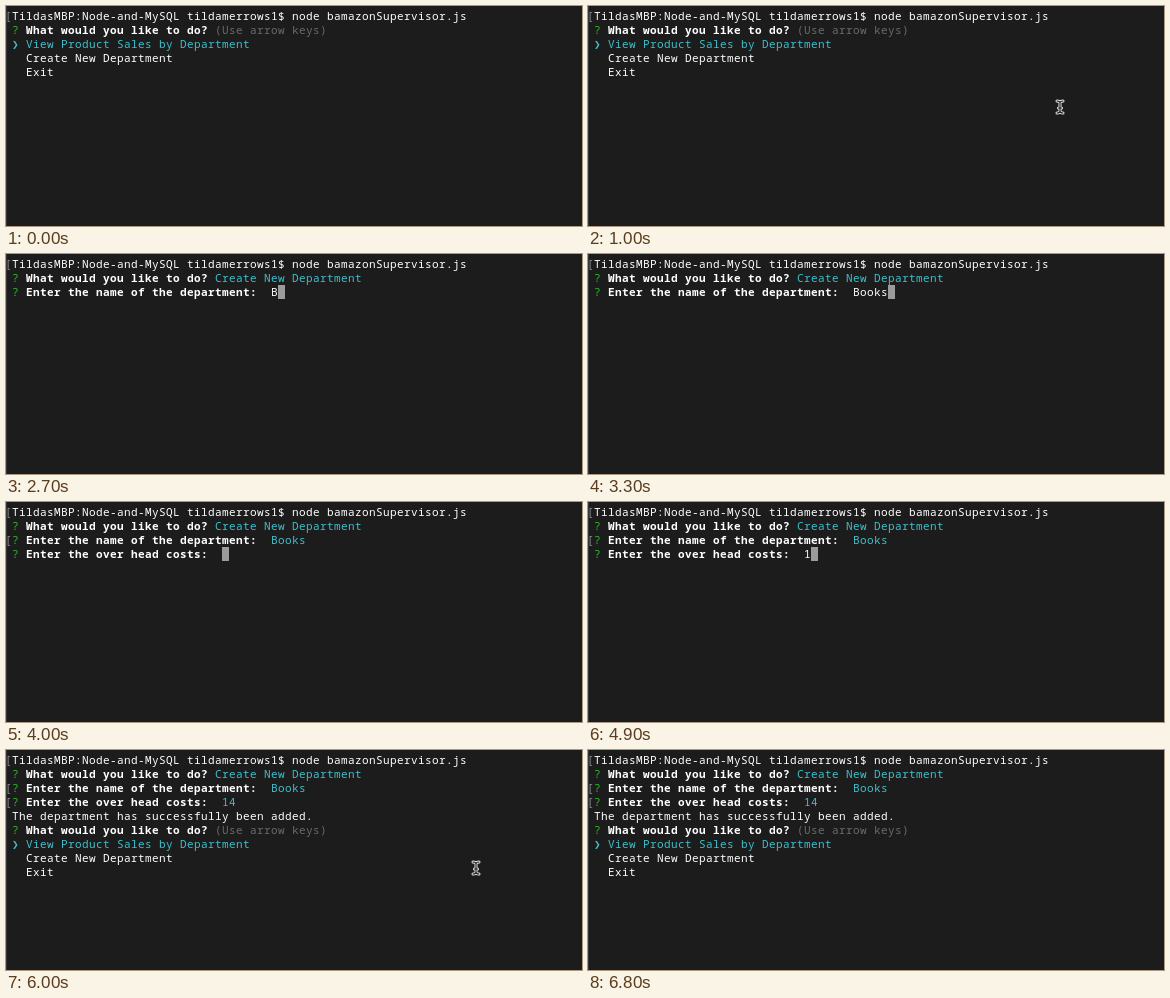
Write an HTML page that moves like this. It is 576 by 220 pixels and loops after 7 s.

```html
<!DOCTYPE html>
<html lang="en">
<head>
<meta charset="utf-8">
<title>Department prompt</title>
<style>
  html, body { margin: 0; width: 100%; height: 100%; overflow: hidden; background: #1c1c1c; }
  #stage { position: relative; width: 576px; height: 220px; overflow: hidden; background: #1c1c1c; }
  #stage::before { content: ""; position: absolute; left: 0; top: 0; width: 1px; height: 100%; background: #38383b; }
  #screen {
    position: absolute; left: 6px; top: 3px;
    font: 500 11px/14px "Noto Sans Mono", "DejaVu Sans Mono", monospace;
    letter-spacing: 0.4px; font-variant-ligatures: none; color: #fff; white-space: pre;
  }
  .row { position: relative; height: 14px; }
  .mark { position: absolute; left: -7px; color: #8c8c8c; }
  .ask { color: #25bc24; }
  .pick { color: #3fbfcb; }
  .hint { color: #6a6a6a; }
  .arrow { display: inline-block; width: 14px; height: 14px; vertical-align: top; }
  .caret { display: inline-block; width: 7px; height: 14px; vertical-align: top; background: #9b9b9b; }
  b { font-weight: 700; }
  #mouse { position: absolute; left: -6px; top: -9px; width: 12px; height: 18px; visibility: hidden; }
</style>
</head>
<body>
<div id="stage">
  <div id="screen"></div>
  <svg id="mouse" viewBox="-6 -9 12 18" fill="none" stroke-linecap="round">
    <path id="beam" d="M-3-6Q0-6 0-4Q0-6 3-6M0-4V4M-3 6Q0 6 0 4Q0 6 3 6M-1.5 1H1.5" stroke="#e8e8e8" stroke-width="3"/>
    <use href="#beam" style="display:none"/>
    <path d="M-3-6Q0-6 0-4Q0-6 3-6M0-4V4M-3 6Q0 6 0 4Q0 6 3 6M-1.5 1H1.5" stroke="#151515" stroke-width="1.1"/>
  </svg>
</div>
<script>
const LOOP = 7000;
const screen_ = document.getElementById("screen");
const mouse = document.getElementById("mouse");

const COMMAND = "TildasMBP:Node-and-MySQL tildamerrows1$ node bamazonSupervisor.js";
const CHOICES = ["View Product Sales by Department", "Create New Department", "Exit"];
const TODO = "What would you like to do?";
const NAME = "Enter the name of the department:";
const COST = "Enter the over head costs:";

// Times of the key presses, in ms
const KEYS = { name: [2700, 3000, 3100, 3200, 3300], cost: [4900, 5000] };
const DOWN = 1200, CHOSEN = 1800, NAMED = 3500, COSTED = 5100, ADDED = 5200;

// Pointer stops: time, x, y; a stop without a place hides it
const PATH = [
  [0], [400, 512, 153], [500, 489, 121], [600, 472, 101], [1200],
  [5800, 472, 101], [5900, 471, 109], [6000, 470, 118], [6100, 472, 129], [6200, 472, 125],
  [6500, 484, 148], [6600, 456, 184], [6700, 416, 211], [6800]
];

const span = (kind, text) => `<span class="${kind}">${text}</span>`;
const row = (text, marked) => `<div class="row">${marked ? span("mark", "[") : ""}${text}</div>`;
const question = (text, rest, marked) => row(`${span("ask", "?")} <b>${text}</b> ${rest}`, marked);
const typed = (text, times, t) => text.slice(0, times.filter(k => t >= k).length);

function menu(chosen, hint) {
  const items = CHOICES.map((c, i) => row(i === chosen
    ? span("pick", span("arrow", "❯") + c)
    : span("arrow", "") + c));
  return question(TODO, hint ? span("hint", "(Use arrow keys)") : "") + items.join("");
}

function input(label, text, times, done, t) {
  const answered = t >= done;
  const value = answered ? span("pick", text) : typed(text, times, t) + span("caret", "");
  return question(label, " " + value, answered);
}

function terminal(t) {
  let out = row(COMMAND, true);
  if (t < CHOSEN) return out + menu(t < DOWN ? 0 : 1, t < DOWN);
  out += question(TODO, span("pick", CHOICES[1]));
  out += input(NAME, "Books", KEYS.name, NAMED, t);
  if (t >= NAMED) out += input(COST, "14", KEYS.cost, COSTED, t);
  if (t >= ADDED) out += row("The department has successfully been added.") + menu(0, true);
  return out;
}

let shown = "";
function draw() {
  const t = performance.now() % LOOP;
  const html = terminal(t);
  if (html !== shown) screen_.innerHTML = shown = html;

  const [, x, y] = PATH.filter(p => t >= p[0]).pop();
  mouse.style.visibility = x === undefined ? "hidden" : "visible";
  if (x !== undefined) mouse.style.transform = `translate(${x}px, ${y}px)`;
  requestAnimationFrame(draw);
}
draw();
</script>
</body>
</html>
```
